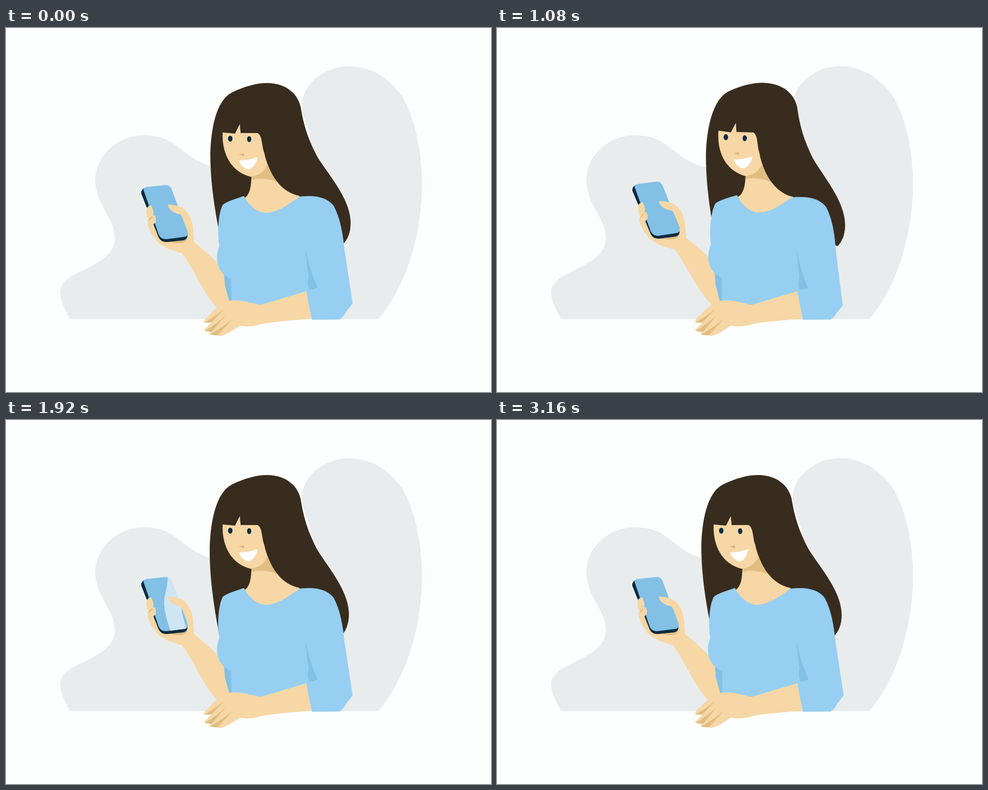
An HTML page that plays this animation: 864x648 px, repeating every 3840 ms.

```html
<!DOCTYPE html>
<html lang="en">
<head>
<meta charset="utf-8">
<title>Woman with phone</title>
<style>
html, body { margin: 0; width: 100%; height: 100%; overflow: hidden; background: #fdfefe; }
svg { display: block; width: 100vw; height: 100vh; }
.skin { fill: #f6d7a5; }
.skin-shade { fill: #e0bd80; }
.shirt { fill: #96cff2; }
.shirt-shade { fill: #82c0e6; }
.navy { fill: #0d2a3e; }
</style>
</head>
<body>
<svg viewBox="0 0 864 648">
  <clipPath id="screenClip"><path id="screenShape" d="M246 291Q243 284 251 283L284 279.5Q292 279 295 287L323.500 362Q326 371 317 372L285 376Q276 376 272 368Z"/></clipPath>

  <path fill="#e9eced" d="M114 518C95 482 86 462 115 443C145 425 194 412 194 373C194 340 159 312 159 271C159 226 200 191 246 191C306 191 312 230 365 246C450 270 555 250 541 190C536 172 526 155 527 132C533 95 570 68 612 68C646 68 680 86 703 118C727 154 741 215 741 278C741 370 712 460 664 518Z"/>

  <path id="heart" fill="#d98dab" d="M0 0C-5 -8 -11 -17 -8 -21C-5 -25 0 -22 0 -16C2 -23 7 -26 9 -22C11 -16 4 -10 0 0Z"/>

  <g id="arm">
    <path class="skin" d="M253 342C251 356 260 368 269 380C283 393 302 398 314 401C336 433 352 472 376 499L382 507L404 500L400 450C388 428 365 405 335 381L329 337L300 318L260 335Z"/>
    <path class="skin-shade" d="M285 379L323 374Q321 383 308 383Q296 383 285 379Z"/>
    <path class="navy" d="M241 295Q240 288 247 285L260 290L323 366Q325 376 316 378L287 381Q277 382 272 373Z"/>
    <use href="#screenShape" class="shirt-shade"/>
    <g clip-path="url(#screenClip)">
      <path id="gloss" fill="#d0e5f4" d="M240 276H270C271 301 262 311 264 331C265 345 269 358 276 378H246C239 358 235 345 234 331C232 311 241 301 240 276Z"/>
    </g>
    <path class="skin" d="M250 322Q254 315 259 316Q264 326 262 333Q268 333 267 345Q262 350 257 357L252 350Q252 343 254 341Q250 334 250 322Z"/>
    <path class="skin-shade" d="M254 342Q257 336 262 334Q259 340 254 344Z"/>
    <path id="thumb" class="skin"/>
  </g>

  <g id="head">
    <path id="hair" fill="#382c1e"/>
    <path class="skin" d="M386 186L408 188L416.500 171L418 187H448C457 192 455 207 460 222C464 242 474 264 485 276C495 288 508 296 523 299L520 306L463 338L440 331L424 303C434 298 437 283 437 265C404 258 384 227 386 186Z"/>
    <path class="skin-shade" d="M434 265C449 264 460 257 466 242C471 257 477 267 484 275C470 268 452 267 437 270V265Z"/>
    <ellipse cx="399.500" cy="197" rx="4" ry="5.300" fill="#102b45"/>
    <ellipse cx="433.200" cy="197.700" rx="3.800" ry="5.300" fill="#102b45"/>
    <path fill="#dcb67a" d="M414.500 225L424 223V228.500Z"/>
    <path fill="#fff" d="M415 236Q432 236 448 229.500C446 241 440 251 432 251.500C424 251 418 244 415 236Z"/>
  </g>

  <g id="torso">
    <path class="shirt-shade" d="M388 435L390 458L398 488L410 492L404 440Z"/>
    <path class="shirt" d="M386 315C394 308 410 304 424 299C434 319 450 329 463 329C488 328 508 310 523 300C532 299 540 299 548 299.500C564 301 577 307 584 317C596 340 600 365 603 395L617.500 490L611 499L600 512L540 492L450 503L402 492L401 448L389 440C374 426 373 406 380 388C376 365 378 330 386 315Z"/>
    <path class="shirt-shade" d="M533 393C538 420 546 440 555 462L541 467C535 455 539 447 539 441C536 425 535 410 533 393Z"/>
  </g>

  <path class="shirt" d="M534 468L545 519.500L594 519Q600 515 604 509L609 495L600 468L556 463Z"/>
  <path class="skin" d="M403 485C420 484 435 489 453 493Q494 481 535 468.500L544 518C515 520 480 522 455 527C440 532 430 532 416 530C406 537 393 547 380 548.500L377 547Q370 548 362 545L367 541Q359 543 353 538L366 524Q359 526 352 524Q355 516 363 510C376 497 389 485 403 485Z"/>
  <path class="skin-shade" d="M352 524Q361 522 389 500L366 524ZM353 538Q363 536 391 512L367 541ZM362 545Q372 543 404 518L377 547Z"/>
</svg>
<script>
const LOOP = 3840, STEP = 40;
const $ = id => document.getElementById(id);
const clamp = v => Math.max(0, Math.min(1, v));
const ease = v => (1 - Math.cos(Math.PI * clamp(v))) / 2;
const span = (t, from, to) => clamp((t - from) / (to - from));

// Eased value along [time, value] keys
function track(keys, t) {
  let value = keys[0][1];
  for (let i = 1; i < keys.length; i++) {
    const [t0, v0] = keys[i - 1], [t1, v1] = keys[i];
    if (t >= t0) value = v0 + (v1 - v0) * ease(span(t, t0, t1));
  }
  return value;
}

const hairPath = "M465 98C500 98 520 118 525 141C530 172 538 198 555 230C575 262 614 305 614 347C614 365 608 377 601 384L540 360L392 420C375 345 364 285 364 225C365 180 374 130 402 115C425 104 445 98 465 98Z";
const swingKeys = [[160, 0], [280, -2], [660, 9.5], [1200, 2.5], [1280, 2.5], [1620, -11], [2280, 7.5], [2580, 0]];

// Hair bends more the further it hangs below the crown
const bendHair = swing => hairPath.replace(/(\d+) (\d+)/g, (_, x, y) =>
  (+x + swing * Math.pow(Math.max(0, y - 150) / 195, 1.15)).toFixed(2) + " " + y);

const bell = (t, from, to) => Math.sin(Math.PI * span(t, from, to)) ** 2;

function thumbPath(u) {
  const x = 10 * u, y = -5 * u;
  return `M${288 + x} ${314.5 + y}C${298 + x} ${314 + y} 309 317 314 320C327 328 332 346 333 353L335 381L324 386L324 369C324 355 318 342 311 332C${302 + x / 2} 330 ${290 + x} ${326 + y} ${288 + x} ${314.5 + y}Z`;
}

function drawHeart(t) {
  const heart = $("heart");
  const shown = t >= 2400;
  heart.setAttribute("visibility", shown ? "visible" : "hidden");
  if (!shown) return;
  const rise = span(t, 2520, 3160);
  const x = track([[2520, 274], [2880, 259], [3160, 274]], t);
  const y = 283 - 110 * Math.pow(rise, 1.2);
  const scale = ease(span(t, 2400, 2560)) * (1 - 0.93 * ease(span(t, 2920, 3160)));
  const tilt = track([[2520, 12], [2880, -12], [3160, 8]], t);
  heart.setAttribute("transform", `translate(${x} ${y}) rotate(${tilt}) scale(${scale})`);
  heart.setAttribute("opacity", 1 - 0.75 * span(t, 3040, 3160));
}

function render(t) {
  const lean = ease(span(t, 160, 520)) - ease(span(t, 1280, 1620));
  $("head").setAttribute("transform", `rotate(${2 * lean} 480 430)`);
  $("torso").setAttribute("transform", `rotate(${1.5 * lean} 480 430)`);
  $("arm").setAttribute("transform", `translate(${lean} ${-6 * lean}) rotate(${-1.3 * lean} 283 330)`);
  $("hair").setAttribute("d", bendHair(track(swingKeys, t)));
  $("thumb").setAttribute("d", thumbPath(bell(t, 720, 1040) + bell(t, 1920, 2320)));
  const sweep = t < 1280 ? t - 460 : t - 1600;
  $("gloss").setAttribute("transform", `translate(${Math.max(-60, Math.min(100, sweep * 0.15))} 0)`);
  drawHeart(t);
}

const start = performance.now();
function tick() {
  const t = (performance.now() - start) % LOOP;
  render(Math.floor(t / STEP) * STEP);
  requestAnimationFrame(tick);
}
render(0);
requestAnimationFrame(tick);
</script>
</body>
</html>
```
